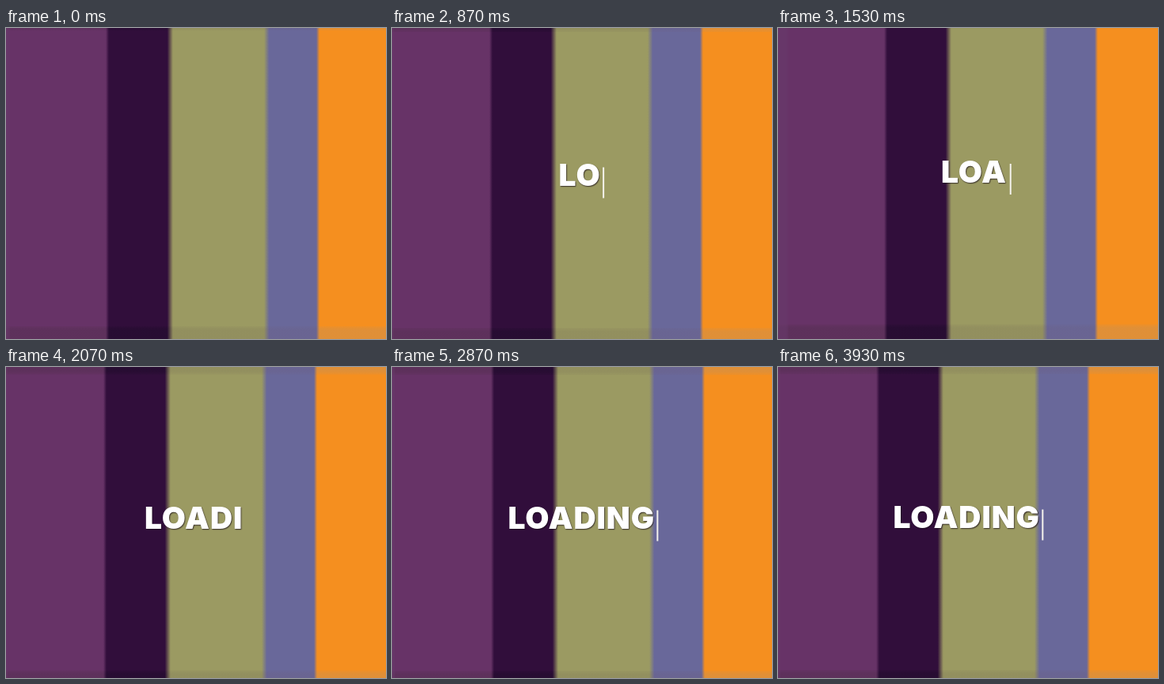
Animation of 480x394 px, one loop 3.99 s. Source, as an HTML page with a canvas:

```html
<!DOCTYPE html>
<html lang="en">
<head>
<meta charset="utf-8">
<title>Loading</title>
<style>
html, body { margin: 0; width: 100%; height: 100%; overflow: hidden; background: #673367; }
canvas { display: block; width: 480px; height: 394px; }
</style>
</head>
<body>
<canvas id="stage" width="480" height="394"></canvas>
<script>
const ctx = document.getElementById('stage').getContext('2d');
const W = 480, H = 394, LOOP = 3990, FPS = 15;
const WORD = 'LOADING';

const MAIN = ['#673367', '#310e3b', '#9b9a62', '#69689a', '#f58f1f'];
const EDGE = ['#5b3058', '#250c30', '#908c5e', '#6a6490', '#da903e'];
const STRIPES = [0, 79.3, 201.2, 266];  // borders, measured from the first one
const SOFT = [2, 3.6, 3.2, 2];          // half width of each blurred border

// camera drift: time, first border x, text middle y
const DRIFT = [
  [0, 128, 184], [867, 125, 186], [1533, 136, 181.5], [2067, 125, 190.5],
  [2533, 130, 188], [3267, 123, 194.5], [3933, 126, 190]
];

function drift(t, axis) {
  const last = DRIFT.length - 1;
  let k = 0;
  while (k < last - 1 && t >= DRIFT[k + 1][0]) k++;
  const slope = i => {
    const a = DRIFT[Math.max(i - 1, 0)], b = DRIFT[Math.min(i + 1, last)];
    return (b[axis] - a[axis]) / (b[0] - a[0]);
  };
  const p = DRIFT[k], q = DRIFT[k + 1], span = q[0] - p[0];
  const u = Math.min(1, (t - p[0]) / span), v = 1 - u;
  return v * v * (1 + 2 * u) * p[axis] + u * u * (3 - 2 * u) * q[axis]
    + span * u * v * (v * slope(k) - u * slope(k + 1));
}

function stripes(x, colors) {
  const g = ctx.createLinearGradient(0, 0, W, 0);
  STRIPES.forEach((s, i) => {
    g.addColorStop((x + s - SOFT[i]) / W, colors[i]);
    g.addColorStop((x + s + SOFT[i]) / W, colors[i + 1]);
  });
  return g;
}

function background(x, y) {
  ctx.fillStyle = stripes(x, MAIN);
  ctx.fillRect(0, 0, W, H);

  // duller strips where the shaken picture ends
  ctx.fillStyle = stripes(x, EDGE);
  ctx.globalAlpha = 0.4;
  for (const d of [0, 2, 4]) {
    const top = y - 181 - d, bottom = y + 194 + d;
    if (top > 0) ctx.fillRect(0, 0, W, top);
    if (bottom < H) ctx.fillRect(0, bottom, W, H - bottom);
  }
  ctx.globalAlpha = 0.35;
  ctx.fillStyle = '#683b6c';
  for (const d of [0, 2]) {
    const left = x - 123 - d;
    if (left > 0) ctx.fillRect(0, 0, left, H);
  }
  ctx.globalAlpha = 1;
}

function label(text, x, y, cursor) {
  ctx.font = '900 39px Inter, "Open Sans", sans-serif';
  ctx.letterSpacing = '0.9px';
  ctx.textAlign = 'left';
  ctx.textBaseline = 'alphabetic';
  const m = ctx.measureText(text);
  const ink = m.actualBoundingBoxRight + m.actualBoundingBoxLeft;
  const left = x - ink / 2;
  ctx.shadowColor = 'rgba(20, 10, 20, 0.75)';
  ctx.shadowOffsetX = 0.8;
  ctx.shadowOffsetY = 1;
  ctx.shadowBlur = 1.5;
  ctx.fillStyle = '#fff';
  ctx.fillText(text, left + m.actualBoundingBoxLeft, y + 14.2);
  ctx.shadowColor = 'transparent';
  if (cursor) {
    ctx.fillStyle = '#f4f2ec';
    ctx.fillRect(left + ink + 4.7, y - 9.5, 2, 39);
  }
}

function draw(now) {
  const step = Math.floor((now % LOOP + 3.5) / 66.6);
  const t = step * 1000 / FPS;
  const x = drift(t, 1), y = drift(t, 2);
  background(x, y);
  const count = Math.min(WORD.length, Math.floor(t / 400));
  label(WORD.slice(0, count), x + 111.5, y, t % 1000 >= 500);
}

let start;
function tick(now) {
  if (start === undefined) start = now;
  draw(Math.max(0, now - start));
  requestAnimationFrame(tick);
}
draw(0);
requestAnimationFrame(tick);
</script>
</body>
</html>
```
